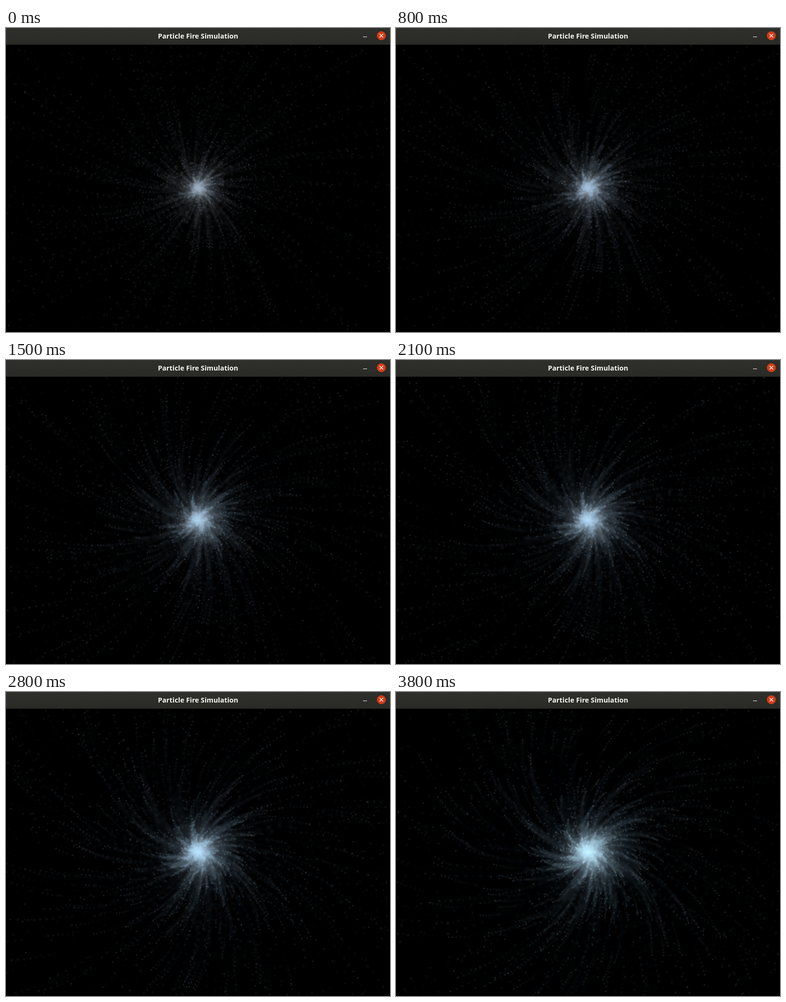
An HTML page with a canvas for the animation above (3900 ms loop, 800 by 634 pixels).

```html
<!DOCTYPE html>
<html lang="en">
<head>
<meta charset="utf-8">
<title>Particle Fire Simulation</title>
<style>
  html, body { margin: 0; width: 100%; height: 100%; overflow: hidden; background: #000; }
  canvas { position: absolute; left: 0; top: 34px; }
  header {
    position: absolute; left: 0; top: 0; width: 800px; height: 35px;
    background: linear-gradient(#2f2f2b, #2a2a26 34px, #222220 34px);
    color: #f6f6f4; text-align: center;
    font: bold 14.35px/33px "Open Sans", "Noto Sans", sans-serif;
  }
  header svg { position: absolute; left: 736px; top: 0; }
</style>
</head>
<body>
<canvas id="stage" width="800" height="600"></canvas>
<header>
  <span>Particle Fire Simulation</span>
  <svg width="64" height="34" fill="none" stroke="#fff">
    <path d="M8 18.5h8"/>
    <circle cx="46" cy="16" r="9.3" fill="#d23d17" stroke="none"/>
    <path d="M42.3 12.3l7.4 7.4m0-7.4l-7.4 7.4" stroke-width="1.4"/>
  </svg>
</header>
<script>
const W = 800, H = 600, ROW = W * 4;
const LOOP = 3900, TICK = 100;
const COUNT = 1000, SPIN = 0.0002, MAX_SPEED = 0.64, RESPAWN = 0.01;
const WARMUP = 18, WARMUP_DT = 111;
const HOLDS = [13, 16, 20, 24, 27, 36]; // ticks on which the picture stays

const ctx = document.getElementById('stage').getContext('2d');
let pixels = new Uint8ClampedArray(ROW * H);
const sums = new Uint16Array(ROW * H);
for (let i = 3; i < pixels.length; i += 4) pixels[i] = 255;

let seed = 20177;
function rand() {
  seed = (seed + 0x6d2b79f5) | 0;
  let r = Math.imul(seed ^ (seed >>> 15), 1 | seed);
  r = (r + Math.imul(r ^ (r >>> 7), 61 | r)) ^ r;
  return ((r ^ (r >>> 14)) >>> 0) / 4294967296;
}

function spawn(p) {
  p.x = p.y = 0;
  p.dir = rand() * Math.PI * 2;
  p.speed = MAX_SPEED * rand() ** 2;
  return p;
}

const swarm = Array.from({ length: COUNT }, () => spawn({}));
let clock = 0;

function move(p, dt) {
  p.dir += SPIN * dt;
  p.x += p.speed * Math.cos(p.dir) * dt;
  p.y += p.speed * Math.sin(p.dir) * dt;
  if (Math.abs(p.x) > 400 || Math.abs(p.y) > 400 || rand() < RESPAWN) spawn(p);
}

// 3 x 3 box blur, rounded down so that faint trails die out
function blur() {
  const out = pixels.slice();
  for (let i = 4; i < sums.length - 4; i++) sums[i] = pixels[i - 4] + pixels[i] + pixels[i + 4];
  for (let i = ROW; i < sums.length - ROW; i++) {
    out[i] = ((sums[i - ROW] + sums[i] + sums[i + ROW]) / 9) | 0;
  }
  pixels = out;
}

function step(dt) {
  clock += dt;
  const [r, g, b] = [1, 2, 3].map(k => (1 + Math.sin(clock * k * 0.0001)) * 128 | 0);
  for (const p of swarm) {
    move(p, dt);
    const x = Math.floor(p.x + W / 2), y = Math.floor(p.y + H / 2);
    // the outermost pixels are never blurred, so they stay black
    if (x < 1 || x >= W - 1 || y < 1 || y >= H - 1) continue;
    const i = y * ROW + x * 4;
    pixels[i] = r;
    pixels[i + 1] = g;
    pixels[i + 2] = b;
  }
  blur();
}

for (let i = 0; i < WARMUP; i++) step(WARMUP_DT);
const frames = [new ImageData(pixels.slice(), W, H)];

function frameAt(n) {
  while (frames.length <= n) {
    step(frames.length <= 12 ? 100 : 130);
    frames.push(new ImageData(pixels.slice(), W, H));
  }
  return frames[n];
}

let shown = -1;
function draw() {
  const tick = Math.floor(performance.now() % LOOP / TICK);
  const n = tick - HOLDS.filter(h => h <= tick).length;
  if (n !== shown) ctx.putImageData(frameAt(n), 0, 0);
  shown = n;
  requestAnimationFrame(draw);
}
draw();
</script>
</body>
</html>
```
